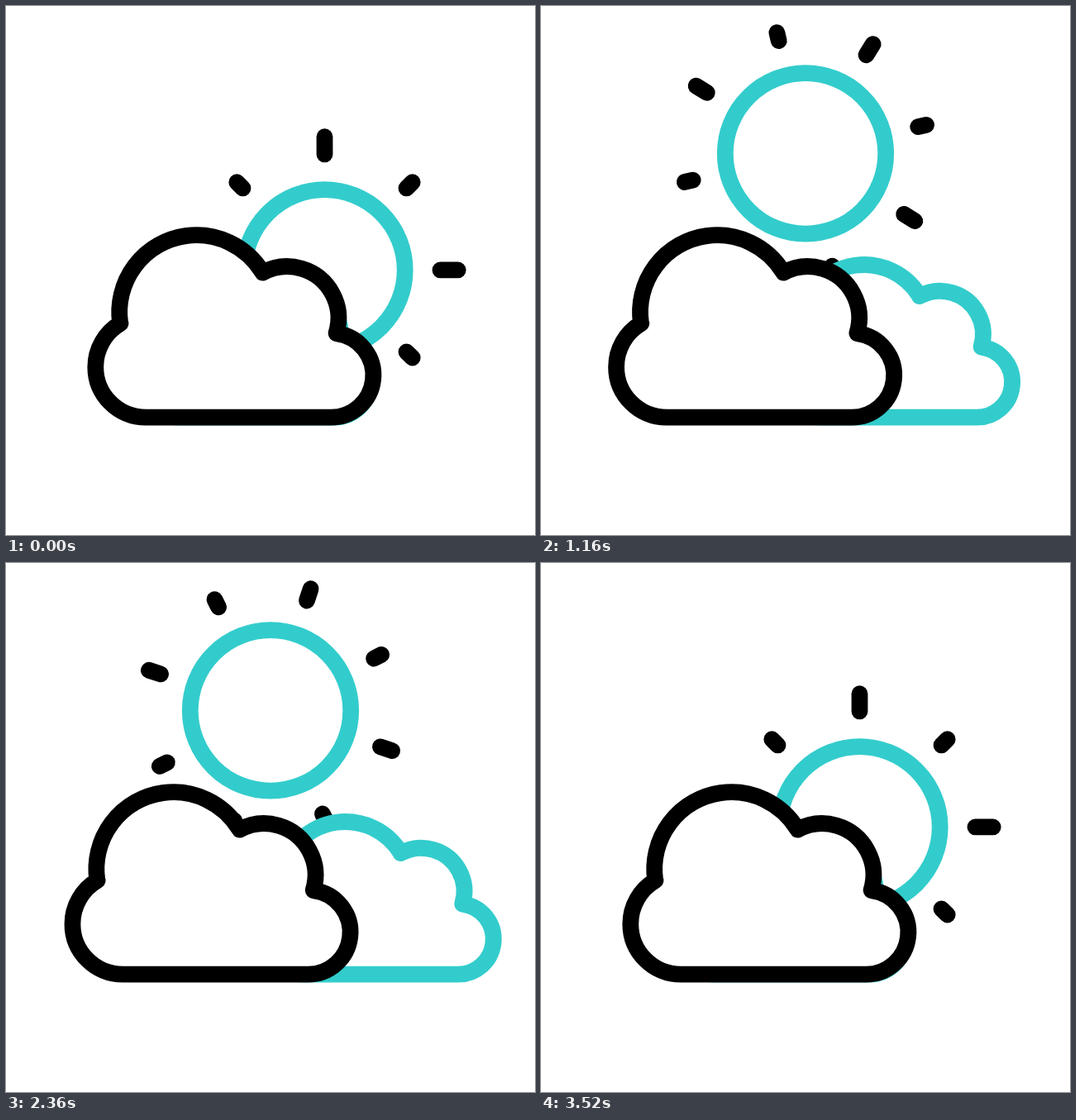
An HTML page with a canvas for the animation above (3600 ms loop, 640 by 640 pixels).

```html
<!DOCTYPE html>
<html lang="en">
<head>
<meta charset="utf-8">
<title>Sun and clouds</title>
<style>
  html, body { margin: 0; width: 100%; height: 100%; overflow: hidden; background: #fff; }
  canvas { display: block; width: 640px; height: 640px; }
</style>
</head>
<body>
<canvas id="stage" width="640" height="640"></canvas>
<script>
const ctx = document.getElementById('stage').getContext('2d');
const LOOP = 3600, TEAL = '#33cccc', BLACK = '#000', STROKE = 19.8;
const RISEN = 660, SINKING = 2360, SUNK = 3280;
const rad = deg => deg * Math.PI / 180;

const linear = (t, from, to) => Math.min(1, Math.max(0, (t - from) / (to - from)));

// Sine ease from 0 to 1; a skew below 1 starts faster, above 1 slower.
const ease = (t, from, to, skew = 1) =>
  (1 - Math.cos(Math.PI * linear(t, from, to) ** skew)) / 2;

// Both clouds part, drift together, part again and close.
const frontLeft = t => 98.5
  - 31 * ease(t, 360, 660)
  + 23.5 * ease(t, 660, 1560)
  - 23.5 * ease(t, 1560, 2260, 2.2)
  + 31 * ease(t, 2260, 3210, 0.7);

const backRight = t => 450
  + 155 * ease(t, 360, 660)
  - 36 * ease(t, 660, 1560, 0.8)
  + 36 * ease(t, 1560, 2260, 2.2)
  - 155 * ease(t, 2260, 3210, 0.95);

const descent = t => 1 - ease(t, 0, RISEN) + ease(t, SINKING, SUNK, 0.82);

const rotation = t => -47.5 * ease(t, 0, RISEN)
  - 24.2 * (1 - (1 - linear(t, RISEN, SINKING)) ** 1.7)
  + 71.7 * ease(t, SINKING, SUNK, 0.87);

const longRay = t => 41.2 - 6.5 * ease(t, 700, 1300) + 6.5 * ease(t, 2300, 2750);
const shortRay = t => 30.2 - 3.7 * ease(t, SINKING, 2700) + 3.7 * ease(t, 2700, SUNK);

// Cloud outline: x, y, radius, start and end angle of each lobe.
const LOBES = [
  [393.4, 446.7, 51, -83, 90],
  [169.3, 436.7, 61, 90, 239.7],
  [230.5, 370.5, 93.3, 171.9, 328.8],
  [340, 377.5, 62.3, 241.6, 377]
];
const CLOUD_RIGHT = 444.4, CLOUD_BASE = 497.7, CLOUD_WIDTH = 355.9;

function drawCloud(right, scale, color) {
  ctx.beginPath();
  for (const [x, y, r, from, to] of LOBES) {
    ctx.arc(right - 10 - (CLOUD_RIGHT - x) * scale, CLOUD_BASE - (CLOUD_BASE - y) * scale,
      r * scale, rad(from), rad(to));
  }
  ctx.closePath();
  ctx.fillStyle = '#fff';
  ctx.fill();
  ctx.strokeStyle = color;
  ctx.stroke();
}

function drawSun(t) {
  // The sun follows a quadratic curve between its high and low positions.
  const s = descent(t), bend = 2 * s * (1 - s);
  ctx.save();
  ctx.translate(320 + 65.5 * (0.92 * bend + s * s), 178.4 + 141 * (0.2 * bend + s * s));
  ctx.strokeStyle = TEAL;
  ctx.beginPath();
  ctx.arc(0, 0, 97.2, 0, 2 * Math.PI);
  ctx.stroke();

  ctx.strokeStyle = BLACK;
  ctx.rotate(rad(rotation(t)));
  for (let i = 0; i < 8; i++) {
    const length = i % 2 ? shortRay(t) : longRay(t);
    ctx.beginPath();
    ctx.moveTo(140, 0);
    ctx.lineTo(120 + length, 0);
    ctx.stroke();
    ctx.rotate(Math.PI / 4);
  }
  ctx.restore();
}

function draw(now) {
  const t = now % LOOP;
  ctx.fillStyle = '#fff';
  ctx.fillRect(0, 0, 640, 640);
  ctx.lineWidth = STROKE;
  ctx.lineCap = ctx.lineJoin = 'round';
  drawSun(t);
  drawCloud(backRight(t), 0.8375, TEAL);
  drawCloud(frontLeft(t) + CLOUD_WIDTH, 1, BLACK);
}

let start;
function tick(now) {
  start ??= now;
  draw(now - start);
  requestAnimationFrame(tick);
}
draw(0);
requestAnimationFrame(tick);
</script>
</body>
</html>
```
